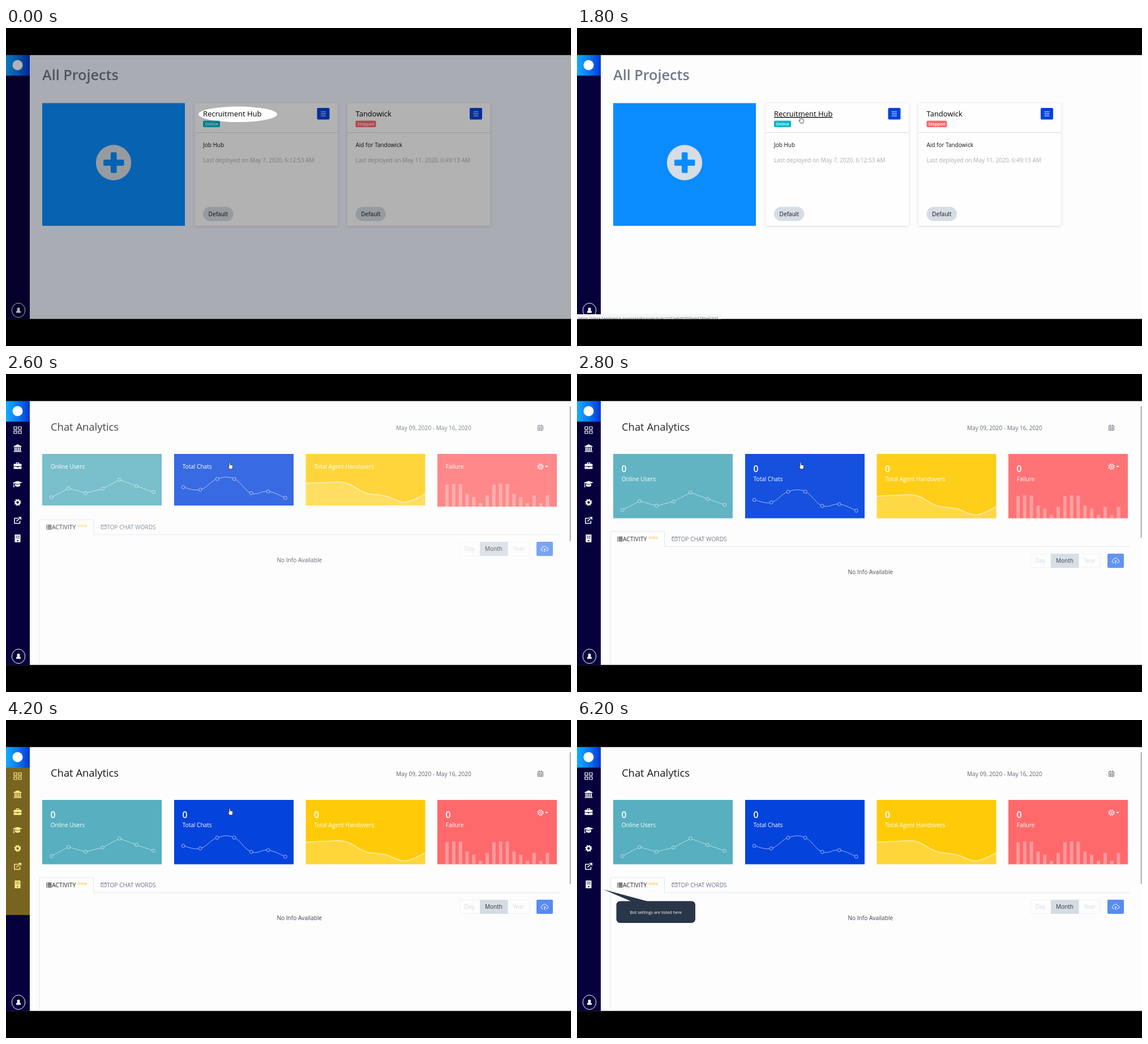
An HTML page that plays this animation: 998 px wide and 561 px high, repeating every 6400 ms.

```html
<!DOCTYPE html>
<html lang="en">
<head>
<meta charset="utf-8">
<title>Dashboard tour</title>
<style>
html, body { margin: 0; height: 100%; overflow: hidden; background: #000; }
svg { display: block; width: 100vw; height: 100vh; }
text { font-family: "Open Sans", "Noto Sans", sans-serif; font-size: 10.1px; }
.name { font-size: 13px; }
.badge { font-size: 7.4px; font-weight: 600; fill: #fff; text-anchor: middle; }
.mid { text-anchor: middle; }
.muted { fill: #a9adb2; }
.card { fill: #fefefe; filter: drop-shadow(0 1px 2px rgba(0, 0, 0, .14)); }
.stroke { fill: none; stroke: #fff; }
</style>
</head>
<body>
<svg viewBox="0 0 998 561">
  <defs>
    <linearGradient id="tile">
      <stop offset="0" stop-color="#15adff"/><stop offset=".5" stop-color="#0a78f5"/><stop offset="1" stop-color="#0436d2"/>
    </linearGradient>
    <g id="gear">
      <circle r="3.5" fill="none" stroke-width="2.6"/>
      <circle r="5.1" fill="none" stroke-width="2" stroke-dasharray="2"/>
    </g>
  </defs>
  <rect id="page" y="47.5" width="998" height="466"/>

  <g id="projects">
    <text x="64" y="92" style="font-size:25.2px;font-weight:600" fill="#6f7a88">All Projects</text>
    <rect x="64" y="132.5" width="252" height="216.5" fill="#0a8cff"/>
    <circle cx="190" cy="237.5" r="31.2" fill="#d6dde4"/>
    <g fill="#0a8cff">
      <rect x="172" y="232.3" width="36.5" height="10.6" rx="2"/>
      <rect x="184.9" y="219.3" width="10.6" height="36.5" rx="2"/>
    </g>
    <g id="bots"></g>
  </g>

  <g id="dash">
    <text x="79" y="100" style="font-size:18.4px" fill="#16161f">Chat Analytics</text>
    <text x="689" y="99" fill="#5c6470">May 09, 2020 - May 16, 2020</text>
    <g fill="none" stroke="#5c6470">
      <path d="M939.5 91.5h9v8h-9zM939.5 94h9M942.5 94v5.5M945.5 94v5.5M939.5 96.8h9" stroke-width=".8"/>
      <path d="M941.8 89.5v2.5M946.2 89.5v2.5" stroke-width="1.4"/>
    </g>
    <g id="cards"></g>
    <g transform="translate(944 163.5)" class="stroke">
      <circle r="1.6"/><circle r="3.9"/><circle r="5" stroke-dasharray="2 1.93" stroke-width="1.2"/>
      <path d="M8 -1.5h6l-3 3z" fill="#fff" stroke="none"/>
    </g>
    <g id="panel">
      <path d="M59 540V278H154.500V304.500H978" fill="none" stroke="#e1e6ef"/>
      <path d="M71 287.700h1.500M71 290h1.500M71 292.300h1.500M71 294.600h1.500M73.500 287.700h7M73.500 290h7M73.500 292.300h7M73.500 294.600h7" stroke="#22242c" stroke-width="1.3"/>
      <text x="81" y="294.8" style="font-size:10.4px" fill="#22242c">ACTIVITY</text>
      <text x="127" y="291" style="font-size:7.7px" fill="#ffb716">beta</text>
      <path d="M168 287.500h9v6.500h-9zl4.500 3.700 4.500-3.700" fill="none" stroke="#69738a" stroke-width=".9"/>
      <text x="178" y="294.8" style="font-size:10.2px" fill="#69738a">TOP CHAT WORDS</text>
      <rect x="801.5" y="317.500" width="123" height="24" fill="none" stroke="#f1f3f6"/>
      <rect x="837" y="317" width="49.500" height="25" fill="#d6dce3"/>
      <g class="mid">
        <text x="818.5" y="333" fill="#d3d8dd">Day</text>
        <text x="861.5" y="333" fill="#31353d">Month</text>
        <text x="905.5" y="333" fill="#d3d8dd">Year</text>
        <text x="518.3" y="353" fill="#40434d">No Info Available</text>
      </g>
      <rect x="937" y="317" width="29" height="25" rx="2" fill="#578cf0"/>
      <path d="M949 333h-1.500a2.600 2.600 0 0 1 -.3 -5.100a4 4 0 0 1 7.600 -.6a2.900 2.900 0 0 1 .7 5.700h-1.500M951.500 335v-6M949.500 331l2-2 2 2" class="stroke"/>
    </g>
  </g>
  <rect id="bar" x="995.5" y="57" width="2.500" fill="#b9bcc3"/>

  <rect y="47.500" width="42" height="466" fill="#06003c"/>
  <rect y="47.500" width="42" height="36.500" fill="url(#tile)"/>
  <circle cx="20.500" cy="65.500" r="9" fill="#fff"/>
  <ellipse cx="22" cy="498" rx="11.700" ry="12.700" class="stroke"/>
  <path d="M18 502.500v-1.500q0 -2.500 2.500 -3h3q2.500 .5 2.500 3v1.500z" fill="#fff"/>
  <circle cx="22" cy="495.800" r="2.600" fill="#fff"/>

  <g id="menu" fill="#fff">
    <path transform="translate(20.500 99)" class="stroke" stroke-width="1.200" d="M-6.500 -6h5v4.600h-5zM1.500 -6h5v4.600h-5zM-6.500 1.400h5v4.600h-5zM1.500 1.400h5v4.600h-5z"/>
    <path transform="translate(20.500 131)" d="M0 -7L7 -3.500V-2.200H-7V-3.500zM-5.500 -1.500h2v5h-2zM-2.300 -1.500h1.800v5h-1.800zM.7 -1.500h1.800v5h-1.800zM3.700 -1.500h2v5h-2zM-6 3.700h12v1h-12zM-7 5.200h14v1.300h-14z"/>
    <path transform="translate(20.500 162)" d="M-2.800 -3.500V-6H2.800V-3.500H5.800Q7 -3.500 7 -2.300V.6H-7V-2.300Q-7 -3.500 -5.800 -3.500zM-1.500 -3.500h3V-4.700h-3zM-7 1.400h5.500v1.200h3v-1.200H7V4.500Q7 5.600 5.800 5.600H-5.800Q-7 5.600 -7 4.500z"/>
    <path transform="translate(20.500 194)" d="M-8.500 -2.500L0 -5.200 8.500 -2.500 0 .6zM-4.500 -.2L0 1.600 4.500 -.2V3.600Q0 6.200 -4.500 3.600zM-7.200 -2h1V2.500l.7 3h-2.400l.7 -3z"/>
    <use href="#gear" x="20.500" y="226.500" stroke="#fff"/>
    <path transform="translate(20.500 258)" class="stroke" stroke-width="1.500" d="M1 -3.500H-5.500V5.500H4V1M-2 2L5.500 -5M1.500 -5.300H5.800V-1"/>
    <path transform="translate(20.500 290)" fill-rule="evenodd" d="M-5 -6.800H5V6.800H-5zM-3 -4.500v1.500h1.500v-1.500zM-.7 -4.500v1.500h1.500v-1.500zM1.600 -4.500v1.500h1.500v-1.500zM-3 -1.500v1.500h1.500v-1.500zM-.7 -1.500v1.500h1.500v-1.500zM1.600 -1.500v1.500h1.500v-1.500zM-1.200 3v2h2.400v-2z"/>
  </g>
  <rect id="glow" y="84" width="42" height="260" fill="rgba(255,217,0,.46)"/>
  <g id="tip">
    <path d="M47 299L127 320.500H97z" fill="#293649"/>
    <rect x="69.500" y="319.500" width="139.500" height="38.500" rx="6.500" fill="#293649"/>
    <text x="139.300" y="341.700" class="mid" style="font-size:7.400px" fill="#fff">Bot settings are listed here</text>
  </g>

  <g id="status">
    <rect y="505" width="255" height="9" fill="#f5f6f9"/>
    <text x="2" y="514.500" style="font-size:7.200px" fill="#63666d">https://desk.tandowick.example/#/projects/4c1b72e8d05f39a6428be07d3</text>
  </g>
  <path id="dim" fill-rule="evenodd" fill="rgba(0,0,0,.3)" d="M0 47H998V514H0zM340 152.300a69.500 13.700 0 0 0 139 0a69.500 13.700 0 0 0 -139 0z"/>
  <path id="hand" fill="#fff" stroke="#25252c" stroke-width=".8" stroke-linejoin="round" d="M394 163.500V157q0 -1.200 1 -1.200t1 1.200V160l3.200 .7q1.300 .4 1.300 1.700v2.200l-1 3.200h-4.500l-2.800 -4q-.3 -1 .5 -1z"/>
  <path id="arrow" fill="#fff" stroke="#25252c" stroke-width=".8" stroke-linejoin="round" d="M.4 .4V8.800L2.400 7.100 3.800 9.800 5 9.200 3.800 6.700H6.600z"/>
  <path d="M0 0H998V47.500H0zM0 513.500H998V561H0z"/>
</svg>

<script>
const $ = id => document.getElementById(id);
const LOOP = 6400, STEP = 200;

const bot = (x, name, state, tint, about, when) => `
  <rect class="card" x="${x}" y="132.500" width="252.500" height="216.500"/>
  <path d="M${x} 184.500h252.500" stroke="#d5d9de"/>
  <text class="name" x="${x + 14.5}" y="156">${name}</text>
  <rect x="${x + 14.5}" y="163.500" width="${state.length * 6 - 6}" height="11.500" rx="2" fill="${tint}"/>
  <text class="badge" x="${x + 11.5 + state.length * 3}" y="172">${state}</text>
  <rect x="${x + 216}" y="141" width="22" height="20.500" rx="2" fill="#0443dc"/>
  <path d="M${x + 222.5} 148h9m-9 3.500h9m-9 3.500h9" stroke="#fff"/>
  <text x="${x + 14.5}" y="210" style="font-size:10px" fill="#15151b">${about}</text>
  <text class="muted" x="${x + 14.5}" y="236.500">Last deployed on ${when} AM</text>
  <rect x="${x + 14.5}" y="315.500" width="53.500" height="25" rx="12.500" fill="#d6dde4"/>
  <text class="mid" x="${x + 41.3}" y="332" fill="#15151b">Default</text>`;

$('bots').innerHTML =
  bot(333.5, 'Recruitment Hub', 'Online', '#00b7c7', 'Job Hub', 'May 7, 2020, 6:12:53') +
  bot(603, 'Tandowick', 'Stopped', '#ff696c', 'Aid for Tandowick', 'May 11, 2020, 6:49:13');
const botName = document.querySelector('.name');

// Spline through points; k = 0 gives straight segments
function curve(pts, k) {
  const at = i => pts[Math.max(0, Math.min(pts.length - 1, i))];
  const ctrl = (i, s) => at(i).map((v, c) => v + s * k * (at(i + 1)[c] - at(i - 1)[c]));
  return 'M' + pts[0] + pts.slice(1).map((p, i) => `C${ctrl(i, 1)} ${ctrl(i + 1, -1)} ${p}`).join('');
}
const spread = (vals, x, dx, y, unit) => vals.map((v, i) => [x + i * dx, y - v * unit]);

function dotted(pts, k, fill) {
  const dots = pts.map(([x, y]) => `<circle cx="${x}" cy="${y}" r="2.900"/>`).join('');
  return `<g stroke="rgba(255,255,255,.6)" fill="${fill}"><path fill="none" d="${curve(pts, k)}"/>${dots}</g>`;
}

const TEAL = '#57afbf', BLUE = '#0443dc', AMBER = '#ffcb08', RED = '#ff696c';
const wave = [78, 81, 80, 45, 34, 12, 40];
const area = curve(spread(wave, 529.5, 35.1, 254.5, .5), .2);
const bars = spread([...wave, ...wave, 12, 40], 776, 11.83, 254.5, .5)
  .map(([x, y]) => `M${x} 254.500V${y}h6V254.500z`).join('');

const cards = [
  [64, TEAL, 'Online Users', dotted(spread([1, 18, 9, 17, 34, 22, 11], 80.3, 30.05, 241, .94), 0, TEAL)],
  [297, BLUE, 'Total Chats', dotted(spread([65, 59, 84, 84, 51, 55, 40], 313, 30.05, 271.4, .76), .2, BLUE)],
  [529.5, AMBER, 'Total Agent Handovers',
    `<path d="${area}V254.500H529.500z" fill="rgba(255,255,255,.2)"/>
     <path d="${area}" fill="none" stroke="rgba(255,255,255,.6)" stroke-width="1.600"/>`],
  [762, RED, 'Failure', `<path d="${bars}" fill="rgba(255,255,255,.32)"/>`]
];
$('cards').innerHTML = cards.map(([x, fill, label, chart]) => `
  <rect class="tile" x="${x}" y="141" width="211" fill="${fill}"/>
  <g class="chart">${chart}</g>
  <text class="count" x="${x + 14.5}" y="173" style="font-size:15.700px;font-weight:600" fill="#fff">0</text>
  <text class="label" x="${x + 14.7}" y="189" fill="#fff">${label}</text>`).join('');

const each = (cls, fn) => document.querySelectorAll(cls).forEach(fn);
const show = (id, on) => $(id).style.display = on ? '' : 'none';
const lift = (el, y) => el.setAttribute('transform', `translate(0 ${-y})`);

// Arrow pointer stops: time, x, y
const stops = [[400, 388, 165], [600], [4400, 372.5, 314], [4600, 334, 373], [4800, 331, 377],
  [5200, 432, 424], [5400, 890, 490], [5600]];

function draw(t) {
  const within = (a, b) => t >= a && t < b;
  const home = t < 2200, loading = t < 2800;

  show('projects', home);
  show('dash', !home);
  show('bar', !home);
  show('menu', !home);
  show('dim', t < 1800);
  show('status', within(800, 2200));
  show('glow', within(4200, 6200));
  show('tip', t >= 4800);
  show('hand', within(600, 4400));
  $('page').setAttribute('fill', t < 1800 ? '#f1f6ff' : '#fdfdfe');
  botName.setAttribute('text-decoration', t >= 600 ? 'underline' : 'none');

  const p = Math.max(0, Math.min(1, (t - 2150) / 1100));
  $('dash').setAttribute('opacity', 1 - (1 - p) ** 3);
  $('bar').setAttribute('height', loading ? 238 : 232);
  lift($('panel'), loading ? 21 : 0);
  const drop = i => !loading ? 0 : i === 3 ? 20.5 : 22.5;
  each('.tile', (el, i) => el.setAttribute('height', 113.5 - drop(i)));
  each('.chart', (el, i) => lift(el, drop(i)));
  each('.label', el => lift(el, drop(0)));
  each('.count', el => el.style.display = loading ? 'none' : '');

  const stop = stops.filter(s => s[0] <= t).pop() || [];
  show('arrow', stop.length > 1);
  if (stop.length > 1) $('arrow').setAttribute('transform', `translate(${stop[1]} ${stop[2]})`);
}

const start = performance.now();
function tick() {
  const t = (performance.now() - start) % LOOP;
  draw(Math.floor(t / STEP) * STEP);
  requestAnimationFrame(tick);
}
tick();
</script>
</body>
</html>
```
